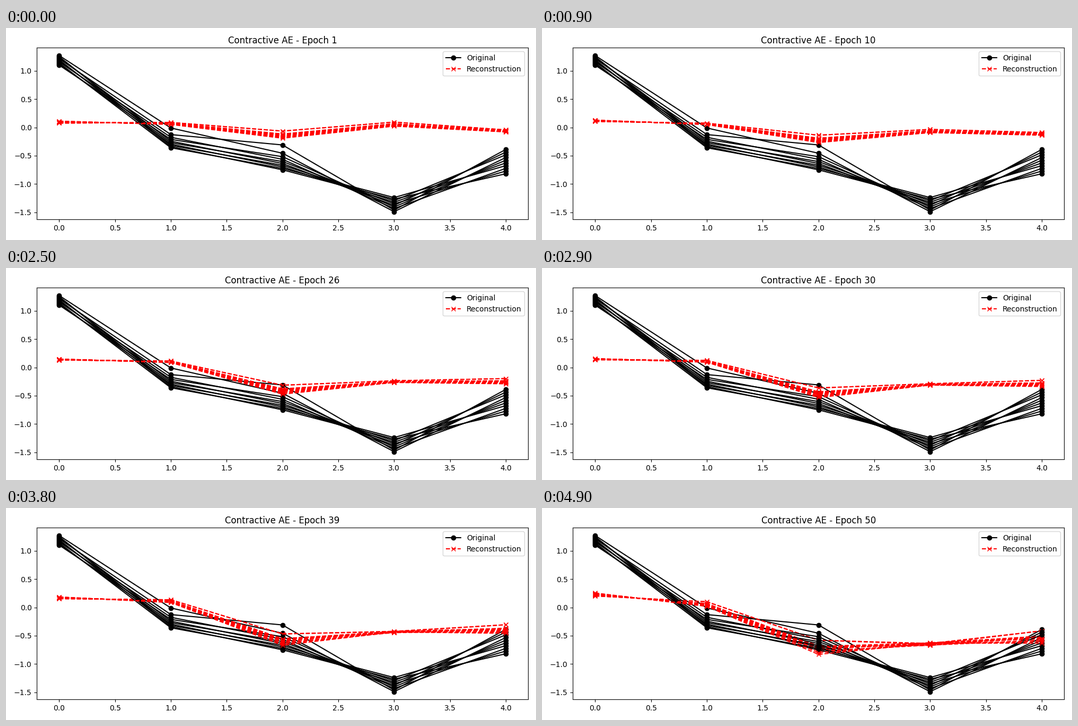
Animation of 1000 by 400 pixels, one loop 5000 ms. Source, as a matplotlib script:

```python
import numpy as np
import matplotlib.pyplot as plt
from matplotlib.animation import FuncAnimation

EPOCHS = 50
COUNT = 10
x = np.arange(5)
n = np.arange(COUNT)

# Each feature spans high..low; the samples take its levels in shuffled order
high = np.array([1.27, -0.01, -0.31, -1.24, -0.39])
low = np.array([1.10, -0.36, -0.75, -1.49, -0.82])
bend = np.array([1, 0.5, 0.5, 1, 1])
ranks = np.column_stack([3 * n % COUNT, n, n ^ 1, 9 - n, (7 * n + 3) % COUNT])
samples = high + (low - high) * (ranks / 9) ** bend

# Latent codes: two outliers on top, the rest thinning out towards -1
code = np.where(n < 2, 1, 0.2 - 1.2 * (np.clip(n - 2, 0, 7) / 7) ** 1.5)
wobble = np.sin(2.4 * n)


def reconstruct(u):
    """Decoder output for all samples at training progress u (0..1)."""
    centre = np.array([
        0.094 + 0.175 * u - 0.303 * u**2 + 0.262 * u**3,
        0.070 - 0.146 * u + 0.672 * u**2 - 0.537 * u**3,
        -0.128 - 0.316 * u - 0.550 * u**2 + 0.289 * u**3,
        0.058 - 0.737 * u + 0.483 * u**2 - 0.452 * u**3,
        -0.062 - 0.247 * u - 0.214 * u**2,
    ])
    spread = np.array([
        -0.018 + 0.042 * u - 0.050 * u**2,
        0.018 - 0.040 * u + 0.063 * u**2,
        0.063 + 0.062 * u**2,
        0.036 - 0.041 * u,
        0.018 + 0.020 * u + 0.070 * u**2,
    ])
    out = centre + np.outer(code, spread)
    out[:, 3] += 0.024 * u**3 * wobble
    return out


fig, ax = plt.subplots(figsize=(10, 4), dpi=100)
recons = []
for k, (sample, recon) in enumerate(zip(samples, reconstruct(0))):
    labels = ("Original", "Reconstruction") if k == 0 else (None, None)
    ax.plot(x, sample, "ko-", label=labels[0])
    recons += ax.plot(x, recon, "rx--", label=labels[1])
ax.legend(loc="upper right")
title = ax.set_title("Contractive AE - Epoch 1")
fig.tight_layout()


def update(i):
    for line, y in zip(recons, reconstruct(i / (EPOCHS - 1))):
        line.set_ydata(y)
    title.set_text(f"Contractive AE - Epoch {i + 1}")
    return [*recons, title]


anim = FuncAnimation(fig, update, frames=EPOCHS, interval=100, repeat=True)
plt.show()
```
